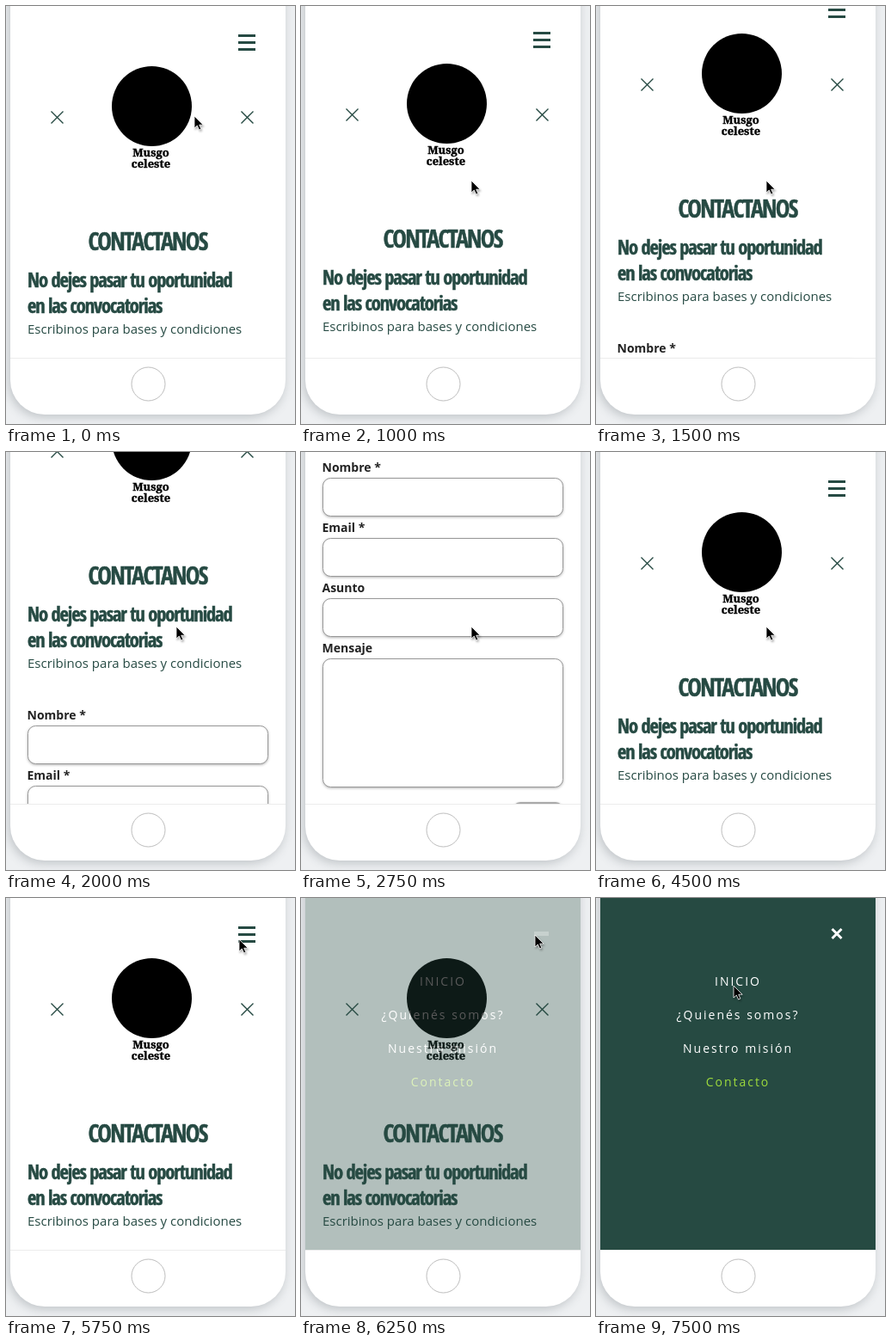
An HTML page that plays this animation: 336x486 px, repeating every 8000 ms.

```html
<!DOCTYPE html>
<html lang="es">
<head>
<meta charset="utf-8">
<title>Contacto</title>
<style>
  html, body { margin: 0; width: 100%; height: 100%; overflow: hidden; background: #eef0f2; }
  .stage { position: relative; width: 336px; height: 486px; overflow: hidden; }
  .phone {
    position: absolute; left: 5px; top: -60px; width: 320px; height: 535px;
    border-radius: 0 0 40px 40px; background: #fff;
    box-shadow: -2px 3px 12px rgba(70, 80, 85, .28);
  }
  svg { position: absolute; left: 0; top: 0; }
  text { font-family: "Open Sans", "Noto Sans", sans-serif; fill: #264a43; }

  .title {
    font-family: "Open Sans Condensed", "Open Sans", "Roboto Condensed", "Noto Sans", sans-serif;
    font-weight: 800; font-stretch: 75%; stroke: #264a43; stroke-width: .5;
  }
  .h1 { font-size: 28px; letter-spacing: -1.8px; text-anchor: middle; }
  .h2 { font-size: 22.5px; letter-spacing: -1.1px; }
  .lead { font-size: 15px; }
  .brand { font: 900 13px "Noto Serif", serif; fill: #000; stroke: #000; stroke-width: .4; text-anchor: middle; }
  .label { font-size: 14px; font-weight: 700; fill: #222; }
  .field rect { fill: #fff; stroke: #999; filter: drop-shadow(0 1px 1.5px rgba(0, 0, 0, .3)); }
  .send { fill: #a9a9a9; filter: drop-shadow(0 1px 1.5px rgba(0, 0, 0, .35)); }
  .send-text { font-size: 17px; fill: #fff; text-anchor: middle; }
  .social { fill: #e8e8e8; }
  .cross { stroke: #264a43; fill: none; }
  .nav text { font-size: 14px; letter-spacing: 2px; fill: #fff; text-anchor: middle; }
  .nav .active { fill: #9fdc3c; }

  .page, .burger, .menu, .bar, .close, .cursor { animation: 8s step-end infinite; }
  .page { animation-name: scroll; }
  .burger { animation-name: burger; }
  .menu { animation-name: menu; }
  .bar { animation-name: bar; }
  .close { animation-name: close; }
  .cursor { animation-name: point; filter: drop-shadow(1px 2px 1px rgba(0, 0, 0, .3)); }

  @keyframes scroll {
    0% { transform: translateY(0); }
    12.5% { transform: translateY(-3px); }
    15.625% { transform: translateY(-37px); }
    18.75% { transform: translateY(-38px); }
    21.875% { transform: translateY(-39px); }
    25% { transform: translateY(-130px); }
    28.125% { transform: translateY(-275px); }
    31.25% { transform: translateY(-375px); }
    34.375% { transform: translateY(-418px); }
    37.5% { transform: translateY(-547px); }
    40.625% { transform: translateY(-543px); }
    50% { transform: translateY(-542px); }
    53.125% { transform: translateY(-220px); }
    56.25%, 100% { transform: translateY(0); }
  }
  @keyframes point {
    0% { transform: translate(219px, 128px); }
    3.125% { transform: translate(197px, 165px); }
    9.375% { transform: translate(198px, 203px); }
    62.5% { transform: translate(255px, 90px); }
    65.625% { transform: translate(273px, 49px); }
    71.875% { transform: translate(271px, 48px); }
    75% { transform: translate(272px, 43px); }
    84.375% { transform: translate(184px, 93px); }
    87.5%, 100% { transform: translate(160px, 102px); }
  }
  @keyframes menu {
    0% { opacity: 0; }
    78.125% { opacity: .35; }
    81.25%, 100% { opacity: 1; }
  }
  @keyframes burger {
    0% { opacity: 1; }
    78.125%, 100% { opacity: 0; }
  }
  @keyframes bar {
    0% { opacity: 0; }
    78.125% { opacity: .28; }
    81.25%, 100% { opacity: 0; }
  }
  @keyframes close {
    0% { opacity: 0; }
    81.25%, 100% { opacity: 1; }
  }
</style>
</head>
<body>
<div class="stage">
  <div class="phone"></div>
  <svg width="336" height="486" viewBox="0 0 336 486">
    <defs>
      <clipPath id="screen"><path d="M5 0H325V409H5Z"/></clipPath>
    </defs>
    <g clip-path="url(#screen)">
      <g class="page">
        <path class="burger" d="M270 34.5H290M270 42.5H290M270 50.5H290" stroke="#264a43" stroke-width="3"/>
        <path class="cross" stroke-width="1.4" d="M52.5 122.5l14 14m0-14l-14 14M273.5 122.5l14 14m0-14l-14 14"/>
        <circle cx="169.5" cy="116.5" r="46.5"/>
        <text class="brand" x="168.5" y="175">Musgo</text>
        <text class="brand" x="168.5" y="188">celeste</text>

        <text class="title h1" x="164.5" y="283.5">CONTACTANOS</text>
        <text class="title h2" x="25" y="327">No dejes pasar tu oportunidad</text>
        <text class="title h2" x="25" y="357">en las convocatorias</text>
        <text class="lead" x="25" y="381">Escribinos para bases y condiciones</text>

        <g class="field">
          <text class="label" x="24.5" y="441">Nombre *</text>
          <rect x="25.5" y="448.5" width="279" height="44" rx="9"/>
          <text class="label" x="24.5" y="511">Email *</text>
          <rect x="25.5" y="518.5" width="279" height="44" rx="9"/>
          <text class="label" x="24.5" y="581">Asunto</text>
          <rect x="25.5" y="588.5" width="279" height="44" rx="9"/>
          <text class="label" x="24.5" y="651">Mensaje</text>
          <rect x="25.5" y="658.5" width="279" height="149" rx="9"/>
        </g>
        <rect class="send" x="246" y="825" width="59" height="33" rx="9"/>
        <text class="send-text" x="275.5" y="848">Enviar</text>
        <path class="cross" stroke-width="2" d="M155.5 872.5l19 19m0-19l-19 19"/>
        <g class="social">
          <circle cx="113.5" cy="955" r="18"/>
          <circle cx="163.5" cy="955" r="18"/>
          <circle cx="213.5" cy="955" r="18"/>
        </g>
      </g>
      <g class="menu">
        <path d="M5 0H325V409H5Z" fill="#264a42"/>
        <g class="nav">
          <text x="165" y="102">INICIO</text>
          <text x="165" y="141">¿Quienés somos?</text>
          <text x="165" y="180">Nuestro misión</text>
          <text class="active" x="165" y="219">Contacto</text>
        </g>
      </g>
      <path class="bar" d="M271 39H288V44H271Z" fill="#fff"/>
      <path class="close" d="M274.5 36l11 11m0-11l-11 11" stroke="#fff" stroke-width="3"/>
    </g>
    <path d="M5 409.5H325" stroke="#ececec"/>
    <circle cx="165.5" cy="439.5" r="19.5" fill="#fff" stroke="#bdbdbd"/>
    <path class="cursor" d="M0 0V14L3.3 11L5.6 16L7.9 15L5.7 10.2H10.2Z" stroke="#fff" stroke-width=".8"/>
  </svg>
</div>
</body>
</html>
```
